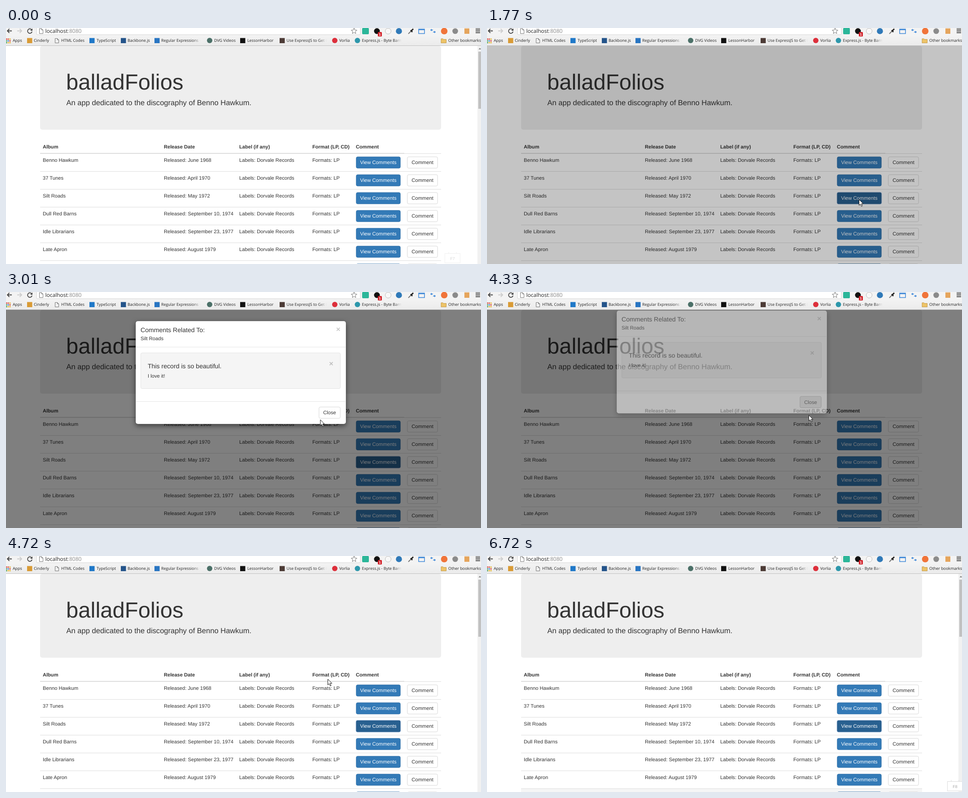
Write an HTML page that moves like this. It is 1059 px wide and 529 px high and loops after 6810 ms.

```html
<!DOCTYPE html>
<html lang="en">
<head>
<meta charset="utf-8">
<title>balladFolios</title>
<style>
  html, body { margin: 0; width: 100%; height: 100%; overflow: hidden; background: #fff; }
  svg { display: block; width: 100vw; height: 100vh; }
  text { font-family: "Liberation Sans", Arial, sans-serif; font-size: 11.2px; fill: #333; text-rendering: geometricPrecision; white-space: pre; }
  text.ui { font-family: "Open Sans", "Noto Sans", sans-serif; font-size: 8.9px; fill: #222; }
  text.cut { fill: url(#fade); }
  text.bold { font-weight: bold; font-size: 11.1px; }
  text.mid { text-anchor: middle; }
  .panel { filter: drop-shadow(0 4px 6px rgba(0, 0, 0, .5)); }
</style>
</head>
<body>
<svg id="stage" viewBox="0 0 1059 529" preserveAspectRatio="none">
  <defs>
    <linearGradient id="fade">
      <stop offset=".8" stop-color="#222"/>
      <stop offset="1" stop-color="#222" stop-opacity="0"/>
    </linearGradient>
    <linearGradient id="bar" x2="0" y2="1">
      <stop offset=".4" stop-color="#f3f3f3"/>
      <stop offset="1" stop-color="#ebebeb"/>
    </linearGradient>
  </defs>
</svg>
<script>
const LOOP = 6810;
const stage = document.getElementById('stage');

function el(tag, attrs = {}, parent = stage) {
  const node = document.createElementNS('http://www.w3.org/2000/svg', tag);
  set(node, attrs);
  parent.appendChild(node);
  return node;
}
function set(node, attrs) {
  for (const k in attrs) node.setAttribute(k, attrs[k]);
}
const rect = (x, y, width, height, fill, more = {}, parent) =>
  el('rect', { x, y, width, height, fill, ...more }, parent);
const dot = (cx, cy, r, fill, more = {}) => el('circle', { cx, cy, r, fill, ...more });
const stroke = (d, color, width = 1, parent) =>
  el('path', { d, fill: 'none', stroke: color, 'stroke-width': width }, parent);
function text(x, y, str, more = {}, parent) {
  const node = el('text', { x, y, ...more }, parent);
  node.textContent = str;
  return node;
}
function button(x, y, w, label, color, parent) {
  const box = rect(x + .8, y + .8, w - 1.6, 25.4, '#fff', { rx: 3, stroke: '#ccc', 'stroke-width': .8 }, parent);
  text(x + w / 2, y + 17.3, label, { class: 'mid', style: `fill:${color}` }, parent);
  return box;
}

// page
rect(0, 0, 1059, 529, '#fff');
rect(76, 40, 894, 188, '#eee', { rx: 5 });
text(134, 138, 'balladFolios', { style: 'font-size:49px' });
text(134.5, 173, 'An app dedicated to the discography of Benno Hawkum.', { style: 'font-size:16.55px' });

const columns = [82, 352, 520, 683, 780];
['Album', 'Release Date', 'Label (if any)', 'Format (LP, CD)', 'Comment']
  .forEach((name, i) => text(columns[i], 270, name, { class: 'bold' }));

const albums = [
  ['Benno Hawkum', 'June 1968'],
  ['37 Tunes', 'April 1970'],
  ['Silt Roads', 'May 1972'],
  ['Dull Red Barns', 'September 10, 1974'],
  ['Idle Librarians', 'September 23, 1977'],
  ['Late Apron', 'August 1979'],
  ['', '']
];
const rows = albums.map(([title, date], i) => {
  const y = 281 + 40 * i;
  const back = rect(76, y, 894, 40, '#fff');
  rect(76, y, 894, 1, '#ddd');
  if (title) {
    [title, 'Released: ' + date, 'Labels: Dorvale Records', 'Formats: LP']
      .forEach((s, c) => text(columns[c], y + 19, s));
  }
  const view = button(780, y + 7, 100, 'View Comments', '#fff');
  const ring = rect(780.2, y + 7.2, 99.6, 26.6, 'none', { rx: 3.5, stroke: '#8fb0dc', 'stroke-width': .8 });
  const add = button(894, y + 7, 69, 'Comment', '#333');
  return { y, back, ring, view, add };
});
rect(76, 280, 812, 1.6, '#ddd');

// scrollbar
const bar = el('g');
rect(1051, 40, 8, 489, '#f1f1f1', {}, bar);
rect(1053, 53, 6, 128, '#c1c1c1', {}, bar);
el('path', { d: 'M1053.5 48l3-3.5 3 3.5z', fill: '#888' }, bar);

// key badges
function keyBadge(x, label, line, color) {
  const g = el('g');
  rect(x + .5, 505.5, 34, 21, '#fff', { stroke: line }, g);
  stroke(`M${x + 9} 502v3M${x + 26} 502v3`, line, 1, g);
  const caption = text(x + 17.5, 519.5, label, { class: 'mid', style: `font-size:9px;fill:${color}` }, g);
  return { g, caption };
}
const badge7 = keyBadge(978, 'F7', '#f0f0f0', '#d6d6d6');
const badge8 = keyBadge(1026, 'F8', '#dcdcdc', '#aaa');

const backdrop = rect(0, 40, 1059, 489, '#000');

// dialog
const dialog = el('g');
rect(289, 65, 469, 231, '#fff', { rx: 5, class: 'panel', stroke: 'rgba(0,0,0,.25)' }, dialog);
const big = { style: 'font-size:14.1px' };
const cross = (x, y) => text(x, y, '×', { class: 'mid bold', style: 'font-size:16.3px;fill:#000', opacity: .22 }, dialog);
text(300, 90, 'Comments Related To:', big, dialog);
text(300, 107.5, 'Silt Roads', {}, dialog);
cross(740.7, 88.5);
rect(289, 123, 469, 1, '#e5e5e5', {}, dialog);
rect(300.5, 136.5, 445, 80, '#f5f5f5', { rx: 3, stroke: '#e3e3e3' }, dialog);
text(316, 171, 'This record is so beautiful.', big, dialog);
text(316, 191.5, 'I love it!', {}, dialog);
cross(725, 165.5);
rect(289, 245, 469, 1, '#e5e5e5', {}, dialog);
const close = button(697, 257, 49, 'Close', '#333', dialog);

// browser chrome
rect(0, 0, 1059, 40, 'url(#bar)');
rect(68, -5, 722, 20, '#fff', { rx: 2, stroke: '#d4d4d4' });
rect(0, 39, 1059, 1, '#c0c0c0');
stroke('M13 6.5H3M7.5 2L3 6.5 7.5 11', '#444', 1.8);
stroke('M25 6.5H35M30.5 2L35 6.5 30.5 11', '#ccc', 1.8);
stroke('M57.3 4.2A5 5 0 1 0 58 8', '#444', 1.8);
el('path', { d: 'M59 1v5h-5z', fill: '#444' });
const page = (x, y, h) => stroke(`M${x} ${y}h5l3 3v${h - 3}h-8zM${x + 5} ${y}v3h3`, '#777');
page(74.5, 1.5, 11);
const address = text(87.5, 10.8, 'localhost', { class: 'ui', style: 'font-size:12px' });
const port = el('tspan', { fill: '#888' }, address);
port.textContent = ':8080';

let star = '';
for (let i = 0; i < 10; i++) {
  const r = i % 2 ? 3 : 6.8, a = Math.PI * (i / 5 - .5);
  star += (i ? 'L' : 'M') + (776 + r * Math.cos(a)) + ' ' + (7 + r * Math.sin(a));
}
stroke(star + 'z', '#777');
rect(794, 0, 15, 14, '#2bb699', { rx: 2 });
dot(827, 7, 6.5, '#111');
rect(829, 9, 9, 10, '#d3222a', { rx: 1.5 });
text(833.5, 17, '1', { class: 'mid bold', style: 'font-size:8px;fill:#fff' });
dot(852, 7, 6.5, '#f8f8f8', { stroke: '#bbb' });
dot(876, 7, 6.8, '#2f79b8');
stroke('M897 13l6-6', '#777', 2);
stroke('M902 5l4 4M903.5 6.5L908 2', '#222', 3);
stroke('M920 2.5h13v10h-13zM920 4h13', '#3b86d8', 1.5);
stroke('M952 4.5h-5M949 2.5l-2 2 2 2M952 9h5M955 7l2 2-2 2', '#2f7fd6', 1.4);
dot(977, 7, 7.3, '#f0743a');
dot(1001.5, 7, 6.3, '#8b8b8b');
rect(1022, 1, 11, 12, '#e5a55c');
stroke('M1047 2.5h10M1047 6.5h10M1047 10.5h10', '#444', 1.8);

// bookmarks
['#d9453d', '#d9453d', '#e9b530', '#47a35a', '#3d7fd6', '#d9453d', '#47a35a', '#e9b530', '#e9b530']
  .forEach((c, i) => rect(4 * (i % 3) - .5, 23.5 + 4 * Math.floor(i / 3), 2.8, 2.8, c));
page(109.5, 23.5, 10);
[[47, '#d99b36'], [186, '#1f78c8'], [256, '#24548a'], [331, '#2875c2'], [522, '#111'], [610, '#4c3b36']]
  .forEach(([x, c]) => rect(x, 22.5, 11.5, 11.5, c));
[[454, '#4b7068'], [733, '#dd2f3b'], [783.5, '#2d97ab']].forEach(([x, c]) => dot(x, 28, 6, c));
el('path', { d: 'M970 24h4l1.5 1.5h6v8H970z', fill: '#edc368', stroke: '#b98d3a', 'stroke-width': .8 });
[[15, 'Apps'], [62, 'Cinderly'], [123, 'HTML Codes'], [202, 'TypeScript'], [271, 'Backbone.js'],
 [346, 'Regular Expressions -', 'cut'], [464, 'DVG Videos'], [538, 'LessonHarbor'],
 [625.5, 'Use ExpressJS to Get I', 'cut'], [743, 'Vorlia'], [793.5, 'Express.js - Byte Barn', 'cut'],
 [986, 'Other bookmarks']]
  .forEach(([x, s, cut = '']) => text(x, 31.3, s, { class: 'ui ' + cut }));

const pointer = el('path', {
  d: 'M0 0V13L3 10.2 5.3 15.2 7.4 14.2 5.2 9.4H9.2z', fill: '#fff', stroke: '#111', 'stroke-width': 1
});

// bursts of change: start, end, number of steps
const bursts = [
  [460, 1070, 9], [1150, 1380, 4], [1630, 2220, 9], [2630, 3310, 10],
  [3410, 3550, 3], [4330, 4720, 6], [4860, 5470, 9], [5550, 5630, 2]
];
// pointer path: time, x, y
const path = [
  [0, 850, 580], [459, 850, 580], [460, 848, 518], [690, 842, 462], [920, 833, 404], [1070, 830, 397],
  [1150, 830, 391], [1380, 829.5, 384.5], [2555, 829.5, 384.5], [2630, 815, 378], [2850, 728, 318], [3010, 700.5, 286],
  [3150, 692, 262], [3230, 697, 256], [3310, 707, 268], [3410, 714, 274], [3550, 717.5, 276],
  [4784, 717.5, 276], [4860, 716, 282], [5165, 700, 395], [5470, 688, 503], [5630, 686, 532]
];

const ramp = (t, a, b) => Math.min(1, Math.max(0, (t - a) / (b - a)));
const easeOut = x => 1 - Math.pow(1 - x, 1.7);

// time of the latest visible step
function snap(t) {
  let last = 0;
  for (const [a, b, n] of bursts) {
    if (t < a) break;
    const gap = (b - a) / (n - 1);
    last = t >= b ? b : a + gap * Math.floor((t - a) / gap + .15);
  }
  return last;
}

function pointerAt(t) {
  const i = path.findIndex(p => p[0] > t);
  if (i < 0) return path[path.length - 1].slice(1);
  const a = path[i - 1], b = path[i], k = ramp(t, a[0], b[0]);
  return [a[1] + (b[1] - a[1]) * k, a[2] + (b[2] - a[2]) * k];
}

function draw(raw) {
  const t = snap(raw);
  const [x, y] = pointerAt(t);
  const open = t >= 1630 && t < 4720;
  const within = (l, top, w, h) => x >= l && x < l + w && y >= top && y < top + h;

  set(pointer, { transform: `translate(${x} ${y})` });
  rows.forEach((row, i) => {
    const over = !open && within(76, row.y, 894, 40);
    const focus = i === 2 && (t >= 1380 && t < 4330 || t >= 4720);
    const dark = focus || over && within(780, row.y + 7, 100, 27);
    set(row.back, { fill: over ? '#f5f5f5' : '#fff' });
    set(row.view, { fill: dark ? '#286090' : '#337ab7', stroke: dark ? '#204d74' : '#2e6da4' });
    set(row.add, { fill: over && within(894, row.y + 7, 69, 27) ? '#e6e6e6' : '#fff' });
    set(row.ring, { opacity: focus ? 1 : 0 });
  });

  set(bar, { opacity: open ? 0 : 1 });
  set(badge7.g, { opacity: t < 1630 ? 1 : 0 });
  set(badge7.caption, { opacity: raw < 70 ? 1 : .85 });
  set(badge8.g, { opacity: raw >= 6720 ? 1 : 0 });

  set(backdrop, { opacity: .5 * (ramp(t, 1708, 1858) - ramp(t, 4546, 4696)) });
  const shift = easeOut(ramp(t, 1860, 2160)) - easeOut(ramp(t, 4250, 4550));
  set(dialog, {
    opacity: ramp(t, 1860, 2010) - ramp(t, 4250, 4400),
    transform: `translate(0 ${-58 * (1 - shift)})`
  });
  const hot = open && t > 3200 && within(697, 257, 49, 27);
  set(close, { fill: hot ? '#e6e6e6' : '#fff', stroke: hot ? '#adadad' : '#ccc' });
}

const start = performance.now();
function tick() {
  draw((performance.now() - start) % LOOP);
  requestAnimationFrame(tick);
}
tick();
</script>
</body>
</html>
```
